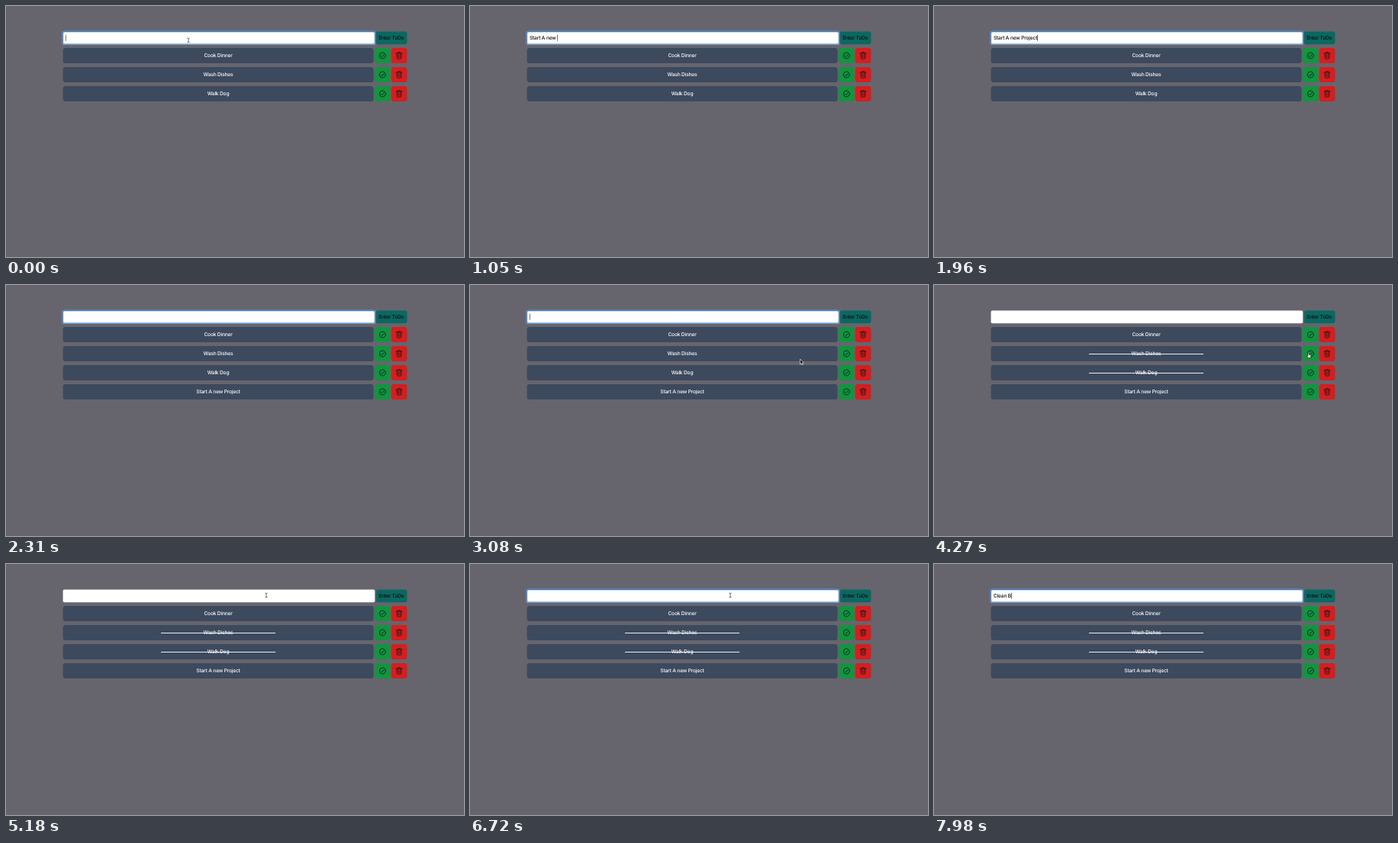
Recreate the animation shown at these times as an HTML page with a canvas. Size 600x329 px, loop 8000 ms.

```html
<!DOCTYPE html>
<html lang="en">
<head>
<meta charset="utf-8">
<title>Todo list</title>
<style>
  html, body { margin: 0; width: 100%; height: 100%; overflow: hidden; background: #66656d; }
  canvas { display: block; }
</style>
</head>
<body>
<canvas id="stage" width="600" height="329"></canvas>
<script>
const ctx = document.getElementById('stage').getContext('2d');
const LOOP = 8000, SUBMIT = 2170, BLUR = 3430, FOCUS = 5250;

// Letters of a burst are spread evenly between its first and last key press.
const bursts = [
  { from: 70, to: 280, text: 'Sta' },
  { from: 490, to: 560, text: 'rt' },
  { from: 700, to: 770, text: ' A' },
  { from: 910, to: 1050, text: ' new ' },
  { from: 1190, to: 1190, text: 'P' },
  { from: 1610, to: 1960, text: 'roject' },
  { from: 7630, to: 7980, text: 'Clean B' },
];
const lastBurst = bursts[bursts.length - 1];

// Resting and turning points of the pointer
const stops = [
  { at: 2450, x: 239, y: 45 },
  { at: 3360, x: 491, y: 117 },
  { at: 3640, x: 491, y: 117 },
  { at: 4130, x: 491, y: 92 },
  { at: 4340, x: 491, y: 92 },
  { at: 4620, x: 435, y: 175 },
  { at: 5180, x: 341, y: 41 },
];

function box(x, y, w, h, r, color) {
  ctx.fillStyle = color;
  ctx.beginPath();
  ctx.roundRect(x, y, w, h, r);
  ctx.fill();
}

function label(str, x, y, color, align = 'center') {
  ctx.fillStyle = color;
  ctx.textAlign = align;
  ctx.fillText(str, x, y);
}

function line(path, x, y, width = 0.8, color = '#10181a', fill) {
  ctx.save();
  ctx.translate(x, y);
  ctx.lineWidth = width;
  ctx.strokeStyle = color;
  const shape = new Path2D(path);
  if (fill) {
    ctx.fillStyle = fill;
    ctx.fill(shape);
  }
  ctx.stroke(shape);
  ctx.restore();
}

function row(name, y, struck) {
  box(74.6, y - 10, 407, 20, 3.6, '#3d495d');
  label(name, 278, y + 2.4, '#fff');
  if (struck) box(203, y, 150, 1, 0, '#eceef1');
  box(483, y - 10, 20.7, 20, 3.6, '#129440');
  line('M4 0A4 4 0 1 1-4 0A4 4 0 1 1 4 0M-1.7 .2L-.4 1.5L1.8-1.5', 493.3, y);
  box(504.6, y - 10, 20.8, 20, 3.6, '#d51e1e');
  line('M-3.8-3H3.8M-1.4-3V-4.2H1.4V-3M-3.1-3L-2.7 3.4Q-2.6 4.2-1.8 4.2H1.8Q2.6 4.2 2.7 3.4L3.1-3' +
    'M-1.2-1.2L-1 2.4M1.2-1.2L1 2.4', 515, y);
}

function typedText(t) {
  return bursts
    .filter(b => b.from <= t && (t < SUBMIT || b.from > SUBMIT))
    .map(({ from, to, text }) => {
      const done = Math.min(1, (t - from) / (to - from || 1));
      return text.slice(0, from === to ? 1 : 1 + Math.floor(done * (text.length - 1)));
    })
    .join('');
}

// The blink restarts with every key press and after the field regains focus.
function caretOn(t) {
  let since = 0;
  for (const { from, to } of bursts) if (from <= t) since = Math.min(t, to);
  if (t >= FOCUS && t < lastBurst.from) since = FOCUS + 280;
  return t < since || (t - since) % 490 < 210;
}

function input(t) {
  const focused = t < BLUR || t >= FOCUS;
  if (focused) {
    box(73.7, 32.7, 410.4, 18.3, 2.8, '#a9bedb');
    box(74.1, 33.1, 409.6, 17.5, 2.4, '#3b7bcb');
    box(75.1, 34.2, 407.6, 15.3, 1.5, '#fff');
  } else {
    box(74.6, 33.4, 408.6, 16.8, 2, '#fff');
  }
  const text = typedText(t);
  label(text, 77.9, 44.3, '#111', 'left');
  if (focused && caretOn(t)) box(77.9 + ctx.measureText(text).width, 37.8, 0.7, 8, 0, '#333');
}

function pointerAt(t) {
  const next = stops.findIndex(s => s.at > t);
  if (next < 1) return next ? stops[stops.length - 1] : stops[0];
  const a = stops[next - 1], b = stops[next];
  const k = (t - a.at) / (b.at - a.at), ease = k * k * (3 - 2 * k);
  return { x: a.x + (b.x - a.x) * ease, y: a.y + (b.y - a.y) * ease };
}

function pointer(t) {
  const typing = t >= bursts[0].from && t < stops[0].at || t >= lastBurst.from;
  if (typing) return;
  const { x, y } = pointerAt(t);
  if (y > 33 && y < 51) {
    line('M-1.2-2.8Q0-2.8 0-2Q0-2.8 1.2-2.8M0-2V2M-1.2 2.8Q0 2.8 0 2Q0 2.8 1.2 2.8', x, y, 0.7, '#333');
  } else if (x > 483) {
    line('M-1.2-3Q-.5-3.8 .1-3V-.8L2.4-.2Q3 .2 2.8 1.2L2.2 3.6H-.8L-2.8 .9Q-2.6 0-1.2 .9Z',
      x, y, 0.6, '#111', '#fff');
  } else {
    line('M-2-3.5V3L-.5 1.7L.5 4L1.5 3.5L.6 1.3H2.5Z', x, y, 0.6, '#fff', '#111');
  }
}

function draw(t) {
  box(0, 0, 600, 329, 0, '#66656d');
  ctx.font = '500 6.67px Inter, sans-serif';
  ctx.letterSpacing = '-0.2px';
  ctx.textRendering = 'geometricPrecision';
  ctx.lineCap = ctx.lineJoin = 'round';
  input(t);
  box(484.8, 33.4, 40.6, 16.8, 2.6, '#0b6861');
  label('Enter ToDo', 504.8, 44.3, '#0a0f10');
  row('Cook Dinner', 65, false);
  row('Wash Dishes', 90, t >= 4270);
  row('Walk Dog', 115, t >= 3570);
  if (t >= SUBMIT) row('Start A new Project', 140, false);
  pointer(t);
}

const start = performance.now();
function tick() {
  draw((performance.now() - start) % LOOP);
  requestAnimationFrame(tick);
}
tick();
</script>
</body>
</html>
```
